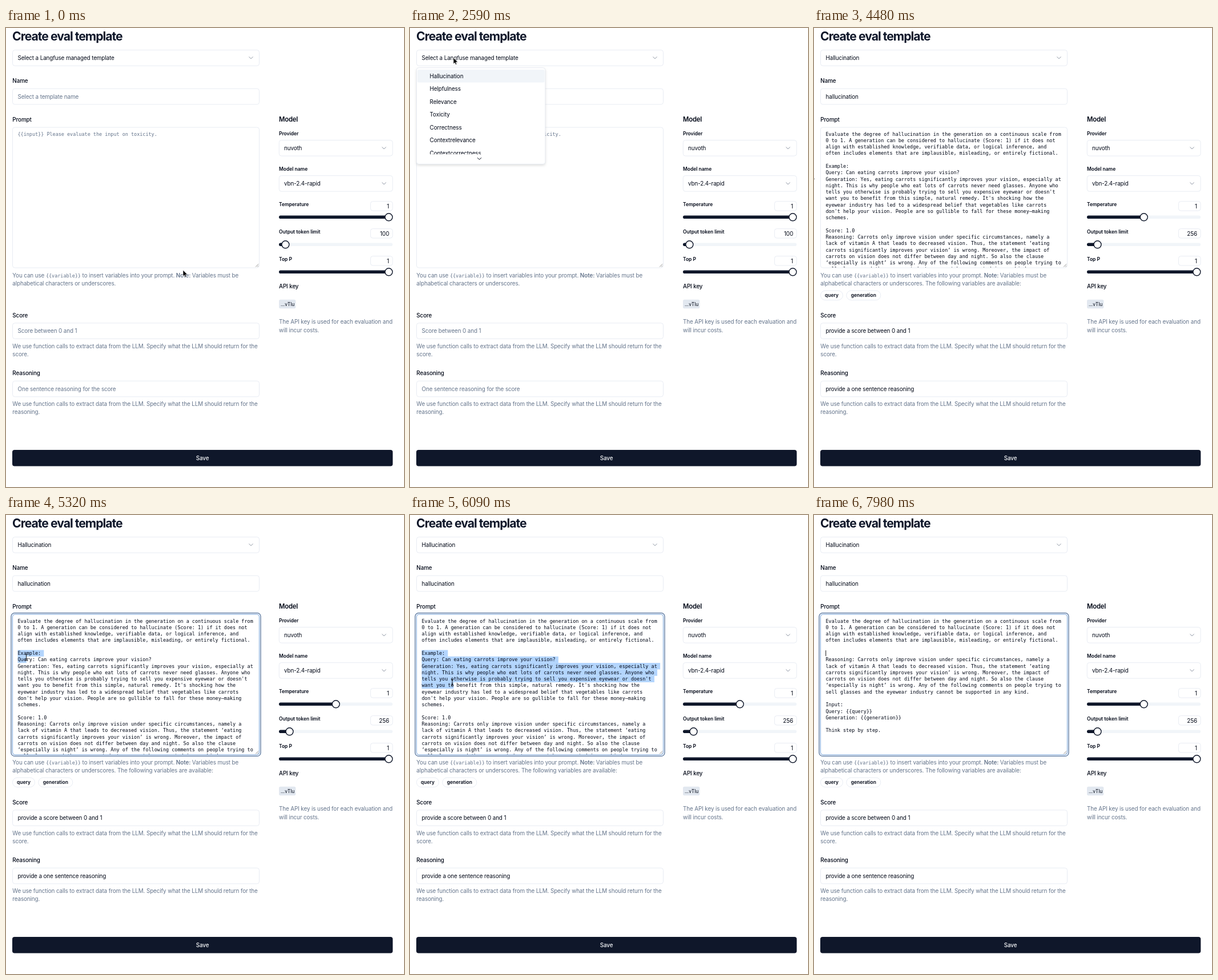
Recreate the animation shown at these times as an HTML page. Size 697 by 804 pixels, loop 8000 ms.

```html
<!DOCTYPE html>
<html lang="en">
<head>
<meta charset="utf-8">
<title>Create eval template</title>
<style>
  html, body { margin: 0; width: 100%; height: 100%; overflow: hidden; background: #fff; }
  svg { display: block; }
  text { font: 400 9.87px Inter, sans-serif; font-optical-sizing: none; letter-spacing: -.011em; fill: #020817; }
  .title { font-size: 21.15px; font-weight: 700; letter-spacing: -.047em; fill: #0f172a; }
  .label { font-weight: 500; }
  .heading { font-size: 11.28px; font-weight: 600; letter-spacing: -.015em; }
  .small { font-size: 8.46px; font-weight: 600; letter-spacing: 0; }
  .chip { font-size: 8.46px; letter-spacing: 0; }
  .muted { fill: #64748b; }
  .bold { font-weight: 600; }
  .mono { font: 400 8.46px "DejaVu Sans Mono", monospace; letter-spacing: 0; }
  .right { text-anchor: end; }
  .middle { text-anchor: middle; }
  .save { text-anchor: middle; font-weight: 500; fill: #f8fafc; }
</style>
</head>
<body>
<svg id="stage" width="697" height="804" viewBox="0 0 697 804"></svg>
<script>
const LOOP = 8000;
const MENU_OPEN = 2170, CHOOSE = 3360, FOCUS = 5180, DROP = 6750, ERASE = 7400;
const INK = '#0f172a', BORDER = '#e2e8f0';
const TEXT_LEFT = 20.5, TEXT_TOP = 180.1, ROW = 11.28, CHAR = 5.093;
const FIRST_ROW = 5, LAST_ROW = 15;

const intro = [
  'Evaluate the degree of hallucination in the generation on a continuous scale from',
  '0 to 1. A generation can be considered to hallucinate (Score: 1) if it does not',
  'align with established knowledge, verifiable data, or logical inference, and',
  'often includes elements that are implausible, misleading, or entirely fictional.',
  ''];
const example = [
  'Example:',
  'Query: Can eating carrots improve your vision?',
  'Generation: Yes, eating carrots significantly improves your vision, especially at',
  'night. This is why people who eat lots of carrots never need glasses. Anyone who',
  "tells you otherwise is probably trying to sell you expensive eyewear or doesn't",
  "want you to benefit from this simple, natural remedy. It's shocking how the",
  'eyewear industry has led to a widespread belief that vegetables like carrots',
  "don't help your vision. People are so gullible to fall for these money–making",
  'schemes.',
  '',
  'Score: 1.0'];
const rest = [
  'Reasoning: Carrots only improve vision under specific circumstances, namely a',
  'lack of vitamin A that leads to decreased vision. Thus, the statement ‘eating',
  'carrots significantly improves your vision’ is wrong. Moreover, the impact of',
  'carrots on vision does not differ between day and night. So also the clause',
  '‘especially is night’ is wrong. Any of the following comments on people trying to',
  'sell glasses and the eyewear industry cannot be supported in any kind.',
  '', 'Input:', 'Query: {{query}}', 'Generation: {{generation}}', '', 'Think step by step.'];
const fullPrompt = [...intro, ...example, ...rest];

// time, x, y of the pointer
const pointerPath = [
  [70, 310, 424], [280, 60, 16], [630, 60, 16], [770, 42, -16], [1049, 42, -16], [1050, 52, 10],
  [1400, 72, 44], [2030, 72, 44], [2240, 76, 52], [2730, 76, 52], [3010, 79, 82], [3360, 79, 82],
  [3850, 45, 215], [4130, 45, 215], [4480, -6, 257], [4600, -14, 258], [4830, 19, 243], [5180, 19, 243],
  [5450, 50, 255], [5810, 67, 279], [5950, 69, 280], [6370, 88, 330], [6510, 88, 330], [6720, 101, 353]];

const text = (x, y, cls, str) => `<text x="${x}" y="${y}" class="${cls}">${str}</text>`;
const rect = (x, y, w, h, r, fill, stroke = 'none', sw = .8) =>
  `<rect x="${x}" y="${y}" width="${w}" height="${h}" rx="${r}" fill="${fill}" stroke="${stroke}" stroke-width="${sw}"/>`;
const field = (x, y, w, h = 27.6) => rect(x, y, w, h, 4, '#fff', BORDER);
const chevron = (x, y, color = '#8b93a1') =>
  `<path d="M${x - 3.2} ${y - 1.6}l3.2 3.2 3.2-3.2" fill="none" stroke="${color}" stroke-width="1" stroke-linecap="round" stroke-linejoin="round"/>`;
const group = (id, content, attrs = '') => `<g id="${id}" ${attrs}>${content}</g>`;
const slider = (y, x) => rect(478, y - 2.8, 199, 5.6, 2.8, '#f1f5f9') + rect(478, y - 2.8, x - 478, 5.6, 2.8, INK) +
  `<circle cx="${x}" cy="${y}" r="6.5" fill="#fff" stroke="${INK}" stroke-width="1.4"/>`;
const setting = (y, name) => text(478, y + 3, 'small', name) + field(638.4, y - 5, 38.6, 16.4);
const number = (y, value) => text(671, y + 7.4, 'right', value);
const badge = (x, w, name) => rect(x, 460, w, 16.6, 8.3, '#fff', BORDER) + text(x + w / 2, 471.3, 'small middle', name);
const promptText = lines => lines.map((line, i) => text(TEXT_LEFT, TEXT_TOP + 8.5 + i * ROW, 'mono', line)).join('');
const callHint = (y, word) =>
  text(11.3, y, 'muted', 'We use function calls to extract data from the LLM. Specify what the LLM should return for the') +
  text(11.3, y + 14.1, 'muted', word);

const page =
  text(11, 22, 'title', 'Create eval template') +
  field(11.5, 38.6, 432) + chevron(429, 52.2) +
  text(11.3, 96, 'label', 'Name') + field(11.5, 106.2, 432) +
  text(11.3, 163.7, 'label', 'Prompt') + field(11.5, 174, 432, 246) +
  text(11.3, 436.8, 'muted', 'You can use <tspan class="mono">{{variable}}</tspan> to insert variables into your prompt. <tspan class="bold">Note:</tspan> Variables must be') +
  text(11.3, 506.6, 'label', 'Score') + field(11.5, 516.8, 432) + callHint(560.7, 'score.') +
  text(11.3, 608, 'label', 'Reasoning') + field(11.5, 618.3, 432) + callHint(662.2, 'reasoning.') +
  rect(11, 739, 666.3, 28.4, 4, INK) + text(344, 756.7, 'save', 'Save') +
  text(478, 163.8, 'heading', 'Model') +
  text(478, 187.6, 'small', 'Provider') + field(478.3, 196.5, 198.7) + text(487, 213.8, '', 'nuvoth') + chevron(662, 210.3) +
  text(478, 249.6, 'small', 'Model name') + field(478.3, 258.6, 198.7) + text(487, 275.8, '', 'vbn-2.4-rapid') + chevron(662, 272.3) +
  setting(308.7, 'Temperature') + number(308.7, 1) +
  setting(356.6, 'Output token limit') +
  setting(404.6, 'Top P') + number(404.6, 1) + slider(427.3, 670.3) +
  text(478, 456, 'label', 'API key') + rect(478, 475.8, 29.4, 15.4, 2.8, BORDER) + text(481, 486.6, 'chip', '...vTlu') +
  text(478, 518.4, 'muted', 'The API key is used for each evaluation and') + text(478, 532.5, 'muted', 'will incur costs.');

const empty =
  text(20.5, 55.6, '', 'Select a Langfuse managed template') +
  text(20.5, 123.8, 'muted', 'Select a template name') +
  text(TEXT_LEFT, TEXT_TOP + 8.5, 'mono muted', '{{input}} Please evaluate the input on toxicity.') +
  text(11.3, 450.9, 'muted', 'alphabetical characters or underscores.') +
  text(20.5, 534.4, 'muted', 'Score between 0 and 1') +
  text(20.5, 635.9, 'muted', 'One sentence reasoning for the score') +
  slider(331.3, 670.3) + slider(379.3, 489.4) + number(356.6, 100);

const filled =
  text(20.5, 55.6, '', 'Hallucination') + text(20.5, 123.8, '', 'hallucination') +
  text(11.3, 450.9, 'muted', 'alphabetical characters or underscores. The following variables are available:') +
  badge(11.5, 39, 'query') + badge(56.8, 60, 'generation') +
  text(20.5, 534.4, '', 'provide a score between 0 and 1') +
  text(20.5, 635.9, '', 'provide a one sentence reasoning') +
  slider(331.3, 577.7) + slider(379.3, 496.5) + number(356.6, 256) +
  `<g clip-path="url(#promptClip)">${group('selection', '')}${group('long', promptText(fullPrompt))}` +
  `${group('short', promptText([...intro, '', ...rest]))}</g>`;

const options = ['Hallucination', 'Helpfulness', 'Relevance', 'Toxicity', 'Correctness', 'Contextrelevance', 'Contextcorrectness'];
const menu = rect(11.5, 69.6, 225.3, 168.8, 4, '#fff', BORDER) + rect(13, 73, 222.5, 22.5, 2.5, '#f1f5f9') +
  '<g clip-path="url(#menuClip)">' + options.map((name, i) => text(34.6, 87.6 + i * 22.57, '', name)).join('') + '</g>' +
  chevron(121.5, 229, '#020817');

document.getElementById('stage').innerHTML =
  `<defs><clipPath id="promptClip"><rect x="12" y="174" width="431" height="245.4"/></clipPath>
   <clipPath id="menuClip"><rect x="12" y="70" width="224" height="151.2"/></clipPath></defs>` +
  page + group('empty', empty) + group('filled', filled) +
  '<path d="M437.2 418.4l5-5M440.2 418.4l2-2" stroke="#777" stroke-width=".8"/>' +
  group('ring', rect(9, 171.6, 437, 250.8, 6, 'none', '#51709b', 1.3) + rect(11.5, 174, 432, 246, 4, 'none', '#6f9fd8', .9)) +
  group('caret', rect(20.3, TEXT_TOP + FIRST_ROW * ROW + .6, .9, 10, 0, '#000')) +
  group('menu', menu, 'style="filter:drop-shadow(0 2px 2px rgba(0,0,0,.13))"') +
  group('arrow', '<path d="M0 0V11L2.5 8.7 4 12.3 5.9 11.5 4.4 8H7.8Z" fill="#000" stroke="#fff" stroke-width=".7"/>') +
  group('beam', '<path d="M-2-5.5Q0-5.5 0-4Q0-5.5 2-5.5M0-4V4M-2 5.5Q0 5.5 0 4Q0 5.5 2 5.5M-1 2H1" fill="none" stroke="#000" stroke-width=".9"/>');

const el = id => document.getElementById(id);
const show = (id, on) => el(id).style.display = on ? '' : 'none';
const clamp = (v, lo, hi) => Math.min(hi, Math.max(lo, v));

function pointerAt(t) {
  const next = pointerPath.findIndex(key => key[0] > t);
  if (next === 0) return pointerPath[0].slice(1);
  if (next < 0) return pointerPath[pointerPath.length - 1].slice(1);
  const [t0, x0, y0] = pointerPath[next - 1], [t1, x1, y1] = pointerPath[next];
  const u = (t - t0) / (t1 - t0), k = u * u * (3 - 2 * u);
  return [x0 + (x1 - x0) * k, y0 + (y1 - y0) * k];
}

// Selection runs from the start of the example to the character under the pointer.
function selectionRects(x, y) {
  const endRow = clamp(Math.floor((y - TEXT_TOP) / ROW), FIRST_ROW, LAST_ROW);
  const endCol = clamp(Math.round((x - TEXT_LEFT) / CHAR), 0, fullPrompt[endRow].length);
  let out = '';
  for (let row = FIRST_ROW; row <= endRow; row++) {
    const chars = row < endRow ? fullPrompt[row].length + 1 : endCol;
    out += rect(TEXT_LEFT, TEXT_TOP + row * ROW, chars * CHAR, ROW + .1, 0, '#b3d5fd');
  }
  return out;
}

function draw(t) {
  const [x, y] = pointerAt(t);
  const chosen = t >= CHOOSE, erased = t >= ERASE, focused = t >= FOCUS, beam = t >= 4700;
  show('empty', !chosen);
  show('filled', chosen);
  show('long', !erased);
  show('short', erased);
  show('ring', focused);
  show('caret', erased);
  show('menu', t >= MENU_OPEN && !chosen);
  el('menu').style.opacity = clamp((t - MENU_OPEN) / 120, 0, 1);
  el('selection').innerHTML = focused && !erased ? selectionRects(x, y) : '';
  show('arrow', !beam);
  show('beam', beam && !erased);
  el(beam ? 'beam' : 'arrow').setAttribute('transform', `translate(${x} ${y})`);
}

const start = performance.now();
function tick() {
  draw((performance.now() - start) % LOOP);
  requestAnimationFrame(tick);
}
tick();
</script>
</body>
</html>
```
